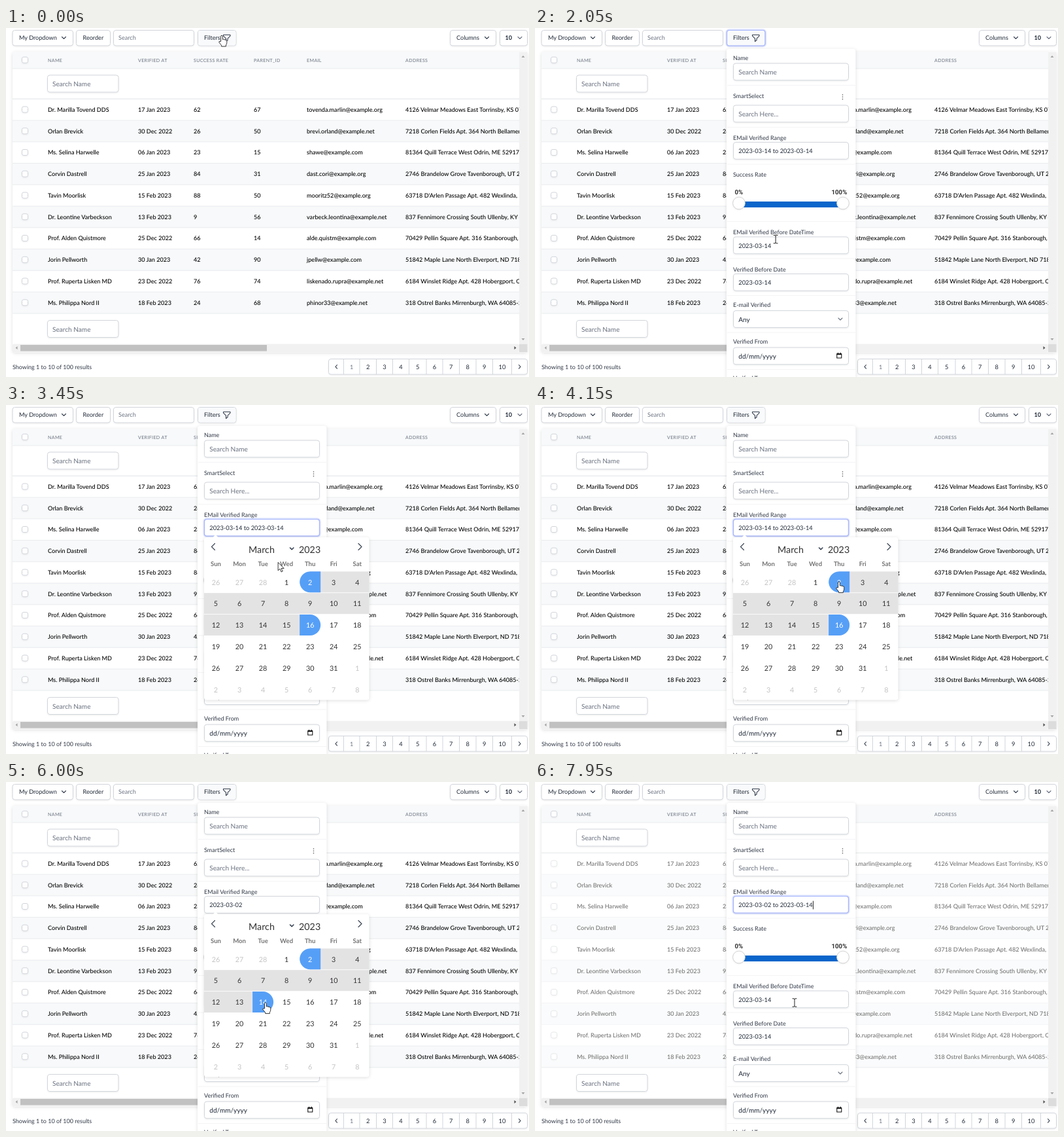
An HTML page that plays this animation: 800 px wide and 533 px high, repeating every 8000 ms.

```html
<!DOCTYPE html>
<html lang="en">
<head>
<meta charset="utf-8">
<title>Table filters</title>
<style>
  html, body { margin: 0; width: 100%; height: 100%; overflow: hidden; background: #fff; }
  svg { display: block; width: 100%; height: 100%; font: 9.1px Lato, "Open Sans", sans-serif; text-rendering: geometricPrecision; }
  text { fill: #1f2937; white-space: pre; }
  .cell { fill: #000; font-weight: 500; }
  .hint { fill: #6b7280; }
  .head { font-size: 7.1px; letter-spacing: .35px; fill: #6b7280; }
  .big { font-size: 10.1px; }
  .label { font-size: 9px; fill: #303846; }
  .date { font-size: 9.3px; }
  .strong { font-weight: 700; }
  .percent { font: bold 9.7px Roboto, "Liberation Sans", sans-serif; fill: #333; }
  .mid { text-anchor: middle; }
  .month { font-size: 14.3px; fill: #333; }
  .week { font-size: 9.6px; font-weight: 700; fill: #757575; }
  .day { font-size: 10.8px; fill: #333; }
  .faint { fill: #c4c4c4; }
  .picked { fill: #fff; }
  .box { fill: #fff; stroke: #d1d5db; }
  .soft { filter: drop-shadow(0 1px 1px #0001); }
  .line { fill: none; stroke: #374151; stroke-width: 1.1; stroke-linecap: round; stroke-linejoin: round; }
  .rule { fill: none; stroke: #e5e7eb; stroke-width: .8; }
  .ring { fill: none; stroke: #a5b4fc; stroke-width: 1.2; }
  .glow { fill: none; stroke: #c7d2fe; stroke-opacity: .55; stroke-width: 2.4; }
  .panel { fill: #fff; filter: drop-shadow(0 1.5px 2.5px #0002); }
</style>
</head>
<body>
<svg id="stage" viewBox="0 0 800 533" preserveAspectRatio="none"></svg>
<script>
const LOOP = 8000;
const ROW = 32.76, ROWS_TOP = 108.3;
const COLUMNS = [64, 202, 287, 379, 460, 611];
const RECORDS = [
  "Dr. Marilla Tovend DDS|17 Jan 2023|62|67|tovenda.marlin@example.org|4126 Velmar Meadows East Torrinsby, KS 07316",
  "Orlan Brevick|30 Dec 2022|26|50|brevi.orland@example.net|7218 Corlen Fields Apt. 364 North Bellamere, OH",
  "Ms. Selina Harwelle|06 Jan 2023|23|15|shawe@example.com|81364 Quill Terrace West Odrin, ME 52917-03",
  "Corvin Dastrell|25 Jan 2023|84|31|dast.cori@example.org|2746 Brandelow Grove Tavenborough, UT 27184",
  "Tavin Moorlisk|15 Feb 2023|88|50|mooritz52@example.org|63718 D'Arlen Passage Apt. 482 Wexlinda, NV 31",
  "Dr. Leontine Varbeckson|13 Feb 2023|9|56|varbeck.leontina@example.net|837 Fennimore Crossing South Ullenby, KY 410",
  "Prof. Alden Quistmore|25 Dec 2022|66|14|alde.quistm@example.com|70429 Pellin Square Apt. 316 Stanborough, DE 6",
  "Jorin Pellworth|30 Jan 2023|42|90|jpellw@example.com|51842 Maple Lane North Elverport, ND 71825",
  "Prof. Ruperta Lisken MD|23 Dec 2022|76|74|liskenado.rupra@example.net|6184 Winslet Ridge Apt. 428 Hobergport, OR 3",
  "Ms. Philippa Nord II|18 Feb 2023|24|68|phinor33@example.net|318 Ostrel Banks Mirrenburgh, WA 64085-2917"
];

const text = (x, y, s, cls = "") => `<text x="${x}" y="${y}" class="${cls}">${s}</text>`;
const rect = (x, y, w, h, fill, r = 0) => `<rect x="${x}" y="${y}" width="${w}" height="${h}" rx="${r}" fill="${fill}"/>`;
const box = (x, y, w, h, r = 3.5, cls = "box soft") =>
  `<rect x="${x}" y="${y}" width="${w}" height="${h}" rx="${r}" class="${cls}"/>`;
const path = (d, cls = "line", extra = "") => `<path d="${d}" class="${cls}" ${extra}/>`;
const chevron = (x, y, color = "#374151") => path(`M${x - 3} ${y - 1.5}l3 3 3-3`, "line", `style="stroke:${color}"`);
const check = y => box(24.5, y - 4.7, 9, 9, 2.5);
const group = (id, body, extra = "") => `<g id="${id}" ${extra}>${body}</g>`;
const ring = (id, x, y, w, h) => group(id, box(x - 1, y - 1, w + 2, h + 2, 4.5, "glow") + box(x, y, w, h, 3.5, "ring"));

function toolbar() {
  return box(10, 3.5, 92.5, 23.5) + text(20, 18.2, "My Dropdown") + chevron(88.5, 15)
    + box(107.5, 3.5, 52, 23.5) + text(117.5, 18.2, "Reorder")
    + box(164.5, 3.5, 123, 23.5) + text(172, 18.2, "Search", "hint")
    + box(293.5, 3.5, 58.5, 23.5) + rect(294, 4, 57.5, 22.5, "#f9fafb", 3) + ring("buttonRing", 293.5, 3.5, 58.5, 23.5)
    + text(303, 18.2, "Filters") + path("M332.5 10.5h10.5v1.6l-3.9 4v2.4l-2.6 2.2v-4.6l-4-4z")
    + box(679.5, 3.5, 70, 23.5) + text(689, 18.2, "Columns") + chevron(735.5, 15)
    + box(755.5, 3.5, 42, 23.5) + text(763.5, 18.2, "10", "strong") + chevron(786, 15, "#6b7280");
}

function record(line, i) {
  const top = ROWS_TOP + i * ROW, middle = top + ROW / 2;
  return rect(10, top, 775, ROW, i % 2 ? "#f7f9fa" : "#fff")
    + path(`M10 ${top}H785`, "rule") + check(middle)
    + line.split("|").map((s, c) => text(COLUMNS[c], middle + 3.1, s, "cell")).join("");
}

function table() {
  const heads = ["NAME", "VERIFIED AT", "SUCCESS RATE", "PARENT_ID", "EMAIL", "ADDRESS"];
  const search = y => box(63.5, y, 108.5, 26) + text(71, y + 17.2, "Search Name", "hint big");
  return `<rect x="10" y="36.5" width="787.5" height="459" rx="4" class="panel"/>`
    + `<g clip-path="url(#view)">` + rect(10, 37, 775, 25, "#f7f9fa") + path("M10 62H785", "rule") + check(49)
    + heads.map((s, c) => text(COLUMNS[c], 51.5, s, "head")).join("")
    + search(72) + group("rows", RECORDS.map(record).join(""))
    + path(`M10 ${ROWS_TOP}H785M10 435.9H785`, "rule") + search(446.5) + "</g>"
    + rect(785, 37, 12.5, 445, "#f1f1f1") + rect(10, 482.5, 775, 12.5, "#f1f1f1", 2) + rect(785, 482.5, 12.5, 12.5, "#dcdcdc")
    + rect(22, 484, 377, 9.5, "#c1c1c1")
    + `<path d="M788.5 45l2.5-3 2.5 3zM788.5 474l2.5 3 2.5-3zM17.5 486l-3 2.5 3 2.5z" fill="#a3a3a3"/>`
    + `<path d="M777.5 486l3 2.5-3 2.5z" fill="#505050"/>`;
}

function footer() {
  const edges = [516.5, 541, 566.5, 591.5, 616.5, 643, 668, 693.5, 719, 744.5, 773.5];
  const pages = edges.slice(1).map((x, i) =>
    text((x + edges[i]) / 2, 520.6, i + 1, i ? "mid date" : "mid hint")).join("");
  return text(10, 520.5, "Showing 1 to 10 of 100 results", "label") + box(493.5, 505.5, 304, 23.5)
    + path(edges.map(x => `M${x} 506v22.5`).join(""), "line", 'style="stroke:#d1d5db;stroke-width:1"')
    + pages + path("M506.5 514.5l-2.5 2.8 2.5 2.8M784.5 514.5l2.5 2.8-2.5 2.8");
}

function filters() {
  const field = (label, labelY, y, value, cls) =>
    text(303, labelY, label, "label") + box(303.5, y, 176, 25.8) + text(311.3, y + 16.8, value, cls);
  const knob = x => `<circle cx="${x}" cy="267.5" r="9.4" fill="#fff" stroke="#ccc" stroke-width=".9" class="soft"/>`;
  return box(293, 32, 197.5, 520, 4, "panel")
    + path([87.5, 151.5, 208, 295.5, 352, 408.5, 465, 521.5].map(y => `M294 ${y}H490`).join(""), "rule", 'style="stroke:#f1f2f4"')
    + field("Name", 48.5, 54, "Search Name", "hint big")
    + field("SmartSelect", 107, 118, "Search Here...", "hint big")
    + [102, 105.3, 108.6].map(y => `<circle cx="470.5" cy="${y}" r=".8" fill="#555"/>`).join("")
    + field("EMail Verified Range", 171, 174.5, `<tspan id="range"></tspan>`, "date") + ring("inputRing", 303.5, 174.5, 176, 25.5)
    + group("caret", path("M425.5 182V194", "line", 'style="stroke:#111;stroke-width:.9"'))
    + text(303, 227, "Success Rate", "label") + text(305.5, 254.4, "0%", "percent") + text(453.5, 254.4, "100%", "percent")
    + rect(312, 265, 159, 9, "#0a66cb") + knob(312) + knob(471)
    + field("EMail Verified Before DateTime", 315, 319, "2023-03-14", "date")
    + field("Verified Before Date", 372, 375.5, "2023-03-14", "date")
    + field("E-mail Verified", 425.5, 431.7, "Any", "big") + chevron(467, 444.5, "#6b7280")
    + field("Verified From", 482, 488, "dd/mm/yyyy", "big")
    + text(303, 538, "Verified To", "label")
    + path("M461.8 497.5h7v6.5h-7zM463.5 496v1M467.3 496v1", "line", 'style="stroke:#111"') + rect(461.8, 497, 7, 2, "#111");
}

const dayX = i => 321 + 36.05 * (i % 7);
const dayY = i => 270.3 + 32.85 * Math.floor(i / 7);

// Cell index of a March date is date + 2.
function days(end) {
  const first = 4, last = end + 2;
  let out = "";
  for (let row = 0; end > 2 && row <= Math.floor(last / 7); row++) {
    const from = row ? 303 : dayX(first);
    const to = row === Math.floor(last / 7) ? dayX(last) : 555.5;
    out += rect(from, dayY(row * 7) - 16, to - from, 32, "#e4e3e4");
  }
  const cap = (i, side) => {
    const x = dayX(i), y = dayY(i);
    return `<path d="M${x - side * 16} ${y - 16}H${x}a16 16 0 0 ${side > 0 ? 1 : 0} 0 32H${x - side * 16}z" fill="#569ff7"/>`;
  };
  out += cap(first, -1) + (end > 2 ? cap(last, 1) : "");
  if (end < 14) out += `<circle cx="${dayX(16)}" cy="${dayY(16)}" r="15.7" fill="none" stroke="#959ea9" stroke-width=".9"/>`;
  for (let i = 0; i < 42; i++) {
    const date = i < 3 ? 26 + i : i < 34 ? i - 2 : i - 33;
    const tone = i < 3 || i > 33 ? "faint" : i === first || i === last ? "picked" : "";
    out += text(dayX(i), dayY(i) + 4.2, date, `day mid ${tone}`);
  }
  return out;
}

function calendar() {
  return box(303, 202, 252.5, 248.5, 4, "panel") + `<path d="M316 202.5l4.5-4.5 4.5 4.5z" fill="#fff"/>`
    + path("M319.5 211.5l-5 5 5 5M539 211.5l5 5-5 5")
    + text(371, 226, "March", "month") + text(448, 226, "2023", "month")
    + path("M434.5 218l2.7 2.7 2.7-2.7", "line", 'style="stroke-width:1.6"')
    + ["Sun", "Mon", "Tue", "Wed", "Thu", "Fri", "Sat"].map((s, i) => text(dayX(i), 245.6, s, "week mid")).join("")
    + group("days", "");
}

function pointer() {
  const shape = 'fill="#fff" stroke="#222" stroke-width=".9" stroke-linejoin="round"';
  return group("hand", `<path ${shape} d="M-1.4 9V1.3a1.4 1.4 0 0 1 2.8 0V6q1.3-.8 2.4.3 1.3-.5 2.2.5 1.6-.2 1.8 1.4V11q0 2-1.4 3.6v2H-.4V15L-4 10.6q-.6-1.8 1-1.8z"/>`)
    + group("arrow", `<path ${shape} d="M0 0V12.5L2.9 9.9 4.9 14.6 7 13.7 5 9.2H9z"/>`)
    + group("beam", path("M-3-6.2h2l1 .8 1-.8h2M0-5.4V5.4M-3 6.2h2l1-.8 1 .8h2", "line", 'style="stroke:#222;stroke-width:1"'));
}

document.getElementById("stage").innerHTML =
  `<clipPath id="view"><rect x="10" y="37" width="775" height="446"/></clipPath>`
  + toolbar() + table() + footer() + group("filters", filters()) + group("calendar", calendar()) + group("pointer", pointer());

const el = id => document.getElementById(id);
const parts = Object.fromEntries(["buttonRing", "rows", "filters", "range", "inputRing", "caret",
  "calendar", "days", "pointer", "hand", "arrow", "beam"].map(id => [id, el(id)]));

const PATH = [[0, 330, 11.5], [1100, 330, 11.5], [1400, 348, 170], [1750, 369, 353], [1850, 369, 355], [2050, 368, 323],
  [2450, 407, 183], [3300, 407, 183], [3450, 416, 240], [3750, 462, 333], [4150, 465, 270], [4600, 465, 270],
  [4750, 447, 295], [5150, 397, 337], [LOOP, 397, 337]];
const FIELDS = [[54, 80], [118, 144], [174, 200], [319, 345], [375, 401], [432, 458]];

const ramp = (t, from, to) => Math.min(1, Math.max(0, (t - from) / (to - from)));
const fade = (node, value) => { node.style.opacity = value; };

function position(t) {
  const i = PATH.findIndex(p => p[0] > t);
  const [t0, x0, y0] = PATH[i - 1], [t1, x1, y1] = PATH[i];
  const k = (t - t0) / (t1 - t0);
  return [x0 + (x1 - x0) * k, y0 + (y1 - y0) * k];
}

function pointerShape(x, y, open) {
  if (y < 28) return "hand";
  if (open && y > 202) {
    const overDay = y > 254 && Math.abs(x - dayX(Math.round((x - 321) / 36.05))) < 16;
    return overDay ? "hand" : "arrow";
  }
  return FIELDS.some(([a, b]) => y >= a && y <= b) ? "beam" : "arrow";
}

const rangeEnd = t => t < 4200 ? 16 : t < 4800 ? 2 : t < 4980 ? 8 : t < 5070 ? 15 : 14;
const rangeText = t => t < 4200 ? "2023-03-14 to 2023-03-14" : t < 6950 ? "2023-03-02" : "2023-03-02 to 2023-03-14";

let shownEnd;
function render(t) {
  fade(parts.buttonRing, ramp(t, 700, 800) - ramp(t, 2450, 2600));
  fade(parts.filters, ramp(t, 920, 1040));
  fade(parts.inputRing, ramp(t, 2450, 2600) - ramp(t, 4180, 4350) + ramp(t, 6930, 7080));
  fade(parts.caret, t >= 6950 ? 1 : 0);
  fade(parts.rows, 1 - .45 * ramp(t, 7000, 7250));
  parts.range.textContent = rangeText(t);

  const open = t >= 2630 && t < 6950;
  const drop = 1 - (1 - ramp(t, 2630, 2980)) ** 4;
  fade(parts.calendar, open ? drop : 0);
  parts.calendar.setAttribute("transform", `translate(0 ${20 * (drop - 1)})`);
  const end = rangeEnd(t);
  if (end !== shownEnd) parts.days.innerHTML = days(shownEnd = end);

  const [x, y] = position(t);
  const shape = pointerShape(x, y, open);
  parts.pointer.setAttribute("transform", `translate(${x} ${y})`);
  for (const name of ["hand", "arrow", "beam"]) fade(parts[name], name === shape ? 1 : 0);
}

const start = performance.now();
function tick() {
  render((performance.now() - start) % LOOP);
  requestAnimationFrame(tick);
}
tick();
</script>
</body>
</html>
```
